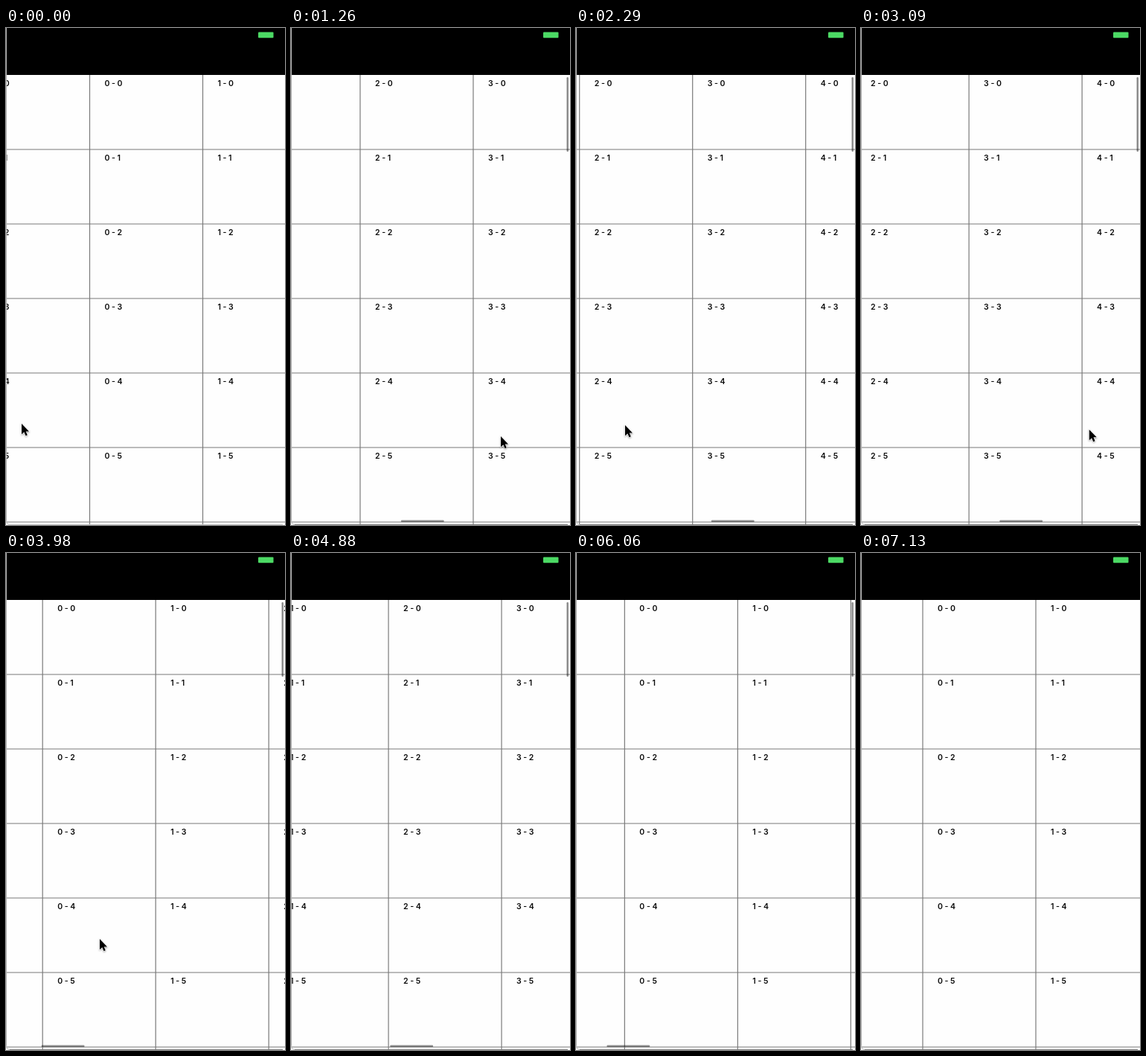
Animation, 375 px wide and 667 px high, one loop 7.85 s. Source, as an HTML page:

```html
<!DOCTYPE html>
<html lang="en">
<head>
<meta charset="utf-8">
<title>Endless grid</title>
<style>
  html, body { margin: 0; width: 100%; height: 100%; overflow: hidden; background: #fefefe; }
  svg { display: block; width: 375px; height: 667px; }
  text { font: 600 10.5px Inter, "Liberation Sans", sans-serif; fill: #0a0a0a; white-space: pre; }
  .rule { stroke: #7a7a7a; stroke-width: 1.2; }
  .bar { fill: #000; fill-opacity: .45; }
</style>
</head>
<body>
<svg viewBox="0 0 375 667">
  <rect width="375" height="667" fill="#fefefe"/>
  <g id="rows"></g>
  <g id="cols"></g>
  <g id="bars">
    <rect class="bar" x="370.5" y="66" width="2.5" height="100" rx="1.25"/>
    <rect class="bar" id="hbar" y="660.5" width="58" height="2.5" rx="1.25"/>
  </g>
  <rect width="375" height="63" fill="#000"/>
  <rect x="339" y="5.5" width="20.5" height="7.7" rx="1" fill="#4cd964"/>
  <path d="M.5 0V661.5Q.5 666.5 5.5 666.5" fill="none" stroke="#b4b4b4"/>
  <path id="base" d="M5 666.5H372" fill="none"/>
  <path id="cursor" d="M0 0V14.2L3.3 11.2 5.5 16.2 7.8 15.2 5.7 10.4H10Z"
        fill="#000" stroke="#fff" stroke-width="1.1" paint-order="stroke"
        style="filter: drop-shadow(0 1px 1px rgba(0,0,0,.35))"/>
</svg>
<script>
const LOOP = 7850, COL_W = 152, COLS = 5, SPAN = COL_W * COLS, TAU = 457;
const $ = id => document.getElementById(id);

function add(parent, tag, attrs, text = '') {
  const el = document.createElementNS('http://www.w3.org/2000/svg', tag);
  for (const k in attrs) el.setAttribute(k, attrs[k]);
  el.textContent = text;
  return parent.appendChild(el);
}

for (let r = 1; r <= 6; r++) {
  const y = 63 + r * 100;
  add($('rows'), 'line', { class: 'rule', x1: 1, x2: 375, y1: y, y2: y });
}
const cols = Array.from({ length: COLS }, (_, c) => {
  const g = add($('cols'), 'g', {});
  add(g, 'line', { class: 'rule', y1: 63, y2: 666 });
  for (let r = 0; r < 6; r++) add(g, 'text', { x: 20, y: 77.8 + r * 100 }, `${c} - ${r}`);
  return g;
});

// Screen refresh moments: first, last, count
const ticks = [0];
for (const [a, b, n] of [
  [770, 770, 1], [950, 1260, 5], [1350, 1690, 5], [1780, 2290, 7], [2380, 2440, 2],
  [2580, 3360, 10], [3450, 3980, 7], [4100, 4190, 2], [4280, 4880, 8], [4960, 5020, 2],
  [5110, 5830, 9], [5910, 6060, 2], [6180, 6660, 7], [6720, 7130, 7]
]) for (let i = 0; i < n; i++) ticks.push(n > 1 ? a + (b - a) * i / (n - 1) : a);

// Flicks: press, release, dragged distance, glide distance
const flicks = [
  [907, 1164, 261, 926],
  [2400, 2658, 250, 891],
  [4236, 4490, 169.2, 605.3]
];

function scrollAt(t) {
  let pos = 112.5;
  flicks.forEach(([press, release, drag, glide], i) => {
    const end = Math.min(t, i + 1 < flicks.length ? flicks[i + 1][0] : LOOP);
    if (end <= press) return;
    const u = Math.min(1, (end - press) / (release - press));
    pos += drag * u * u;
    if (end > release) pos += glide * (1 - Math.exp((release - end) / TAU));
  });
  return pos;
}

// Pointer legs: start, end, x, y, easing
const pull = u => u * u, glideTo = u => u * u * (3 - 2 * u), steady = u => u;
const legs = [
  [907, 1164, 282, 548, pull],
  [1500, 2200, 66, 533, glideTo],
  [2400, 2658, 316, 540, pull],
  [2900, 3750, 126, 518, glideTo],
  [4236, 4490, 295, 526, pull],
  [4490, 4640, 400, 532, steady]
];

function pointerAt(t) {
  let x = 21, y = 531;
  for (const [a, b, tx, ty, ease] of legs) {
    if (t <= a) break;
    const k = ease(Math.min(1, (t - a) / (b - a)));
    x += (tx - x) * k;
    y += (ty - y) * k;
  }
  return [x, y];
}

const wrap = (v, low) => low + (((v - low) % SPAN) + SPAN) % SPAN;

function draw(t) {
  const s = wrap(scrollAt(t), COL_W - SPAN);
  cols.forEach((g, c) =>
    g.setAttribute('transform', `translate(${wrap(s + c * COL_W, -COL_W).toFixed(2)})`));
  $('hbar').setAttribute('x', 66.5 - 0.385 * s);
  $('bars').setAttribute('opacity', t < 950 ? 0 : Math.max(0, Math.min(1, (7130 - t) / 478)));
  $('base').setAttribute('stroke', t < 770 ? '#c4c4c4' : '#7c7c7c');
  $('cursor').setAttribute('transform', `translate(${pointerAt(t)})`);
}

const start = performance.now();
function frame() {
  const t = (performance.now() - start) % LOOP;
  let i = ticks.length - 1;
  while (ticks[i] > t) i--;
  draw(ticks[i]);
  requestAnimationFrame(frame);
}
frame();
</script>
</body>
</html>
```
